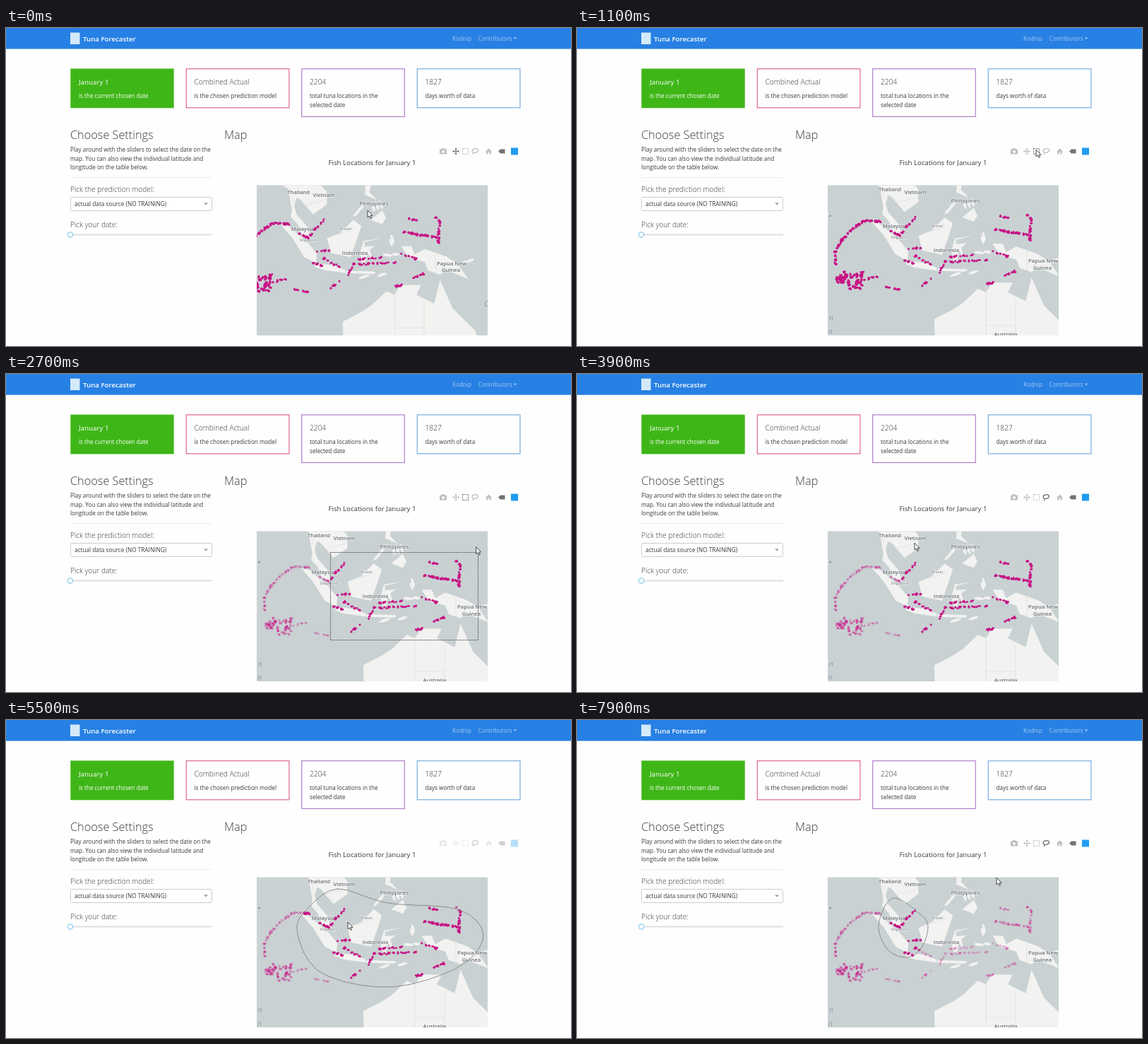
An HTML page with a canvas that plays this animation: 800 px wide and 450 px high, repeating every 8 s.

```html
<!DOCTYPE html>
<html lang="en">
<head>
<meta charset="utf-8">
<title>Tuna Forecaster</title>
<style>
html, body { margin: 0; width: 800px; height: 450px; overflow: hidden; background: #fefefe; }
svg, canvas { position: absolute; left: 0; top: 0; }
text { font: 8.15px "Open Sans", "Noto Sans", sans-serif; fill: #373a3c; }
.h { font-size: 10.2px; font-weight: 300; }
.big { font-size: 16.3px; font-weight: 300; }
.nav { fill: #a4caf3; }
.on { fill: #fff; }
.card { fill: none; stroke-width: 1.3; opacity: .85; }
</style>
</head>
<body>
<svg width="800" height="450" viewBox="0 0 800 450">
  <rect width="800" height="29.6" fill="#2780e3"/>
  <rect x="91" y="6.5" width="13.5" height="16.5" fill="#d3eafa"/>
  <text x="109" y="18.7" class="on" style="font-size:9.7px;font-weight:600">Tuna Forecaster</text>
  <text x="632" y="18" class="nav">Kodnip</text>
  <text x="668.5" y="18" class="nav">Contributors</text>
  <path d="M718.5 13.5h5l-2.5 2.5z" fill="#a4caf3"/>

  <rect x="91.3" y="57.5" width="146.4" height="55.8" fill="#3fb618"/>
  <rect class="card" x="255.3" y="57.8" width="145.6" height="55" stroke="#e0568c"/>
  <rect class="card" x="418.7" y="57.8" width="145.6" height="67.6" stroke="#aa74c6"/>
  <rect class="card" x="582.3" y="57.8" width="145.6" height="55" stroke="#6ba6df"/>
  <text x="103" y="79.7" class="on" style="font-size:9.8px">January 1</text>
  <text x="103" y="99" class="on">is the current chosen date</text>
  <text x="266.5" y="79.7" class="h">Combined Actual</text>
  <text x="266.5" y="99">is the chosen prediction model</text>
  <text x="430" y="79.7" class="h">2204</text>
  <text x="430" y="99">total tuna locations in the</text>
  <text x="430" y="111.5">selected date</text>
  <text x="593.5" y="79.7" class="h">1827</text>
  <text x="593.5" y="99">days worth of data</text>

  <text x="91" y="157.3" class="big">Choose Settings</text>
  <text x="309" y="157.3" class="big">Map</text>
  <text x="91" y="175">Play around with the sliders to select the date on the</text>
  <text x="91" y="187.5">map. You can also view the individual latitude and</text>
  <text x="91" y="200">longitude on the table below.</text>
  <path d="M91 211.5h201" stroke="#ececec"/>
  <text x="91" y="231.7" class="h">Pick the prediction model:</text>
  <rect x="91.5" y="239.5" width="200" height="19" rx="2" fill="#fff" stroke="#ccc"/>
  <text x="97" y="252" style="font-size:8.25px">actual data source (NO TRAINING)</text>
  <path d="M280 247.5h6l-3 3z" fill="#999"/>
  <text x="91" y="281.7" class="h">Pick your date:</text>
  <path d="M91 292.5h201" stroke="#dfdfe3" stroke-width="2"/>
  <circle cx="91" cy="292.5" r="3.6" fill="#fff" stroke="#8ccbec" stroke-width="1.3"/>
  <text x="456.5" y="193.5" style="font-size:9.7px">Fish Locations for January 1</text>
</svg>
<canvas id="stage" width="800" height="450"></canvas>

<script>
const ctx = document.getElementById('stage').getContext('2d');
const LOOP = 8000, STEP = 100, TAU = Math.PI * 2;
const FONT = '"Open Sans", "Noto Sans", sans-serif';

const clamp = v => Math.max(0, Math.min(1, v));
const ease = v => v * v * (3 - 2 * v);
const mix = (a, b, k) => a.map((v, i) => v + (b[i] - v) * k);
let seed = 7;
const rand = () => (seed = seed * 16807 % 2147483647) / 2147483647;

function polygon(pts) {
  const p = new Path2D();
  pts.forEach(([x, y]) => p.lineTo(x, y));
  p.closePath();
  return p;
}
const points = str => str.split(' ').map(p => p.split(',').map(Number));

// Mercator: longitude, latitude to stage
const DEG = 4.78;
const project = ([lon, lat]) =>
  [lon * DEG - 37.6, 301.5 - DEG * Math.asinh(Math.tan(lat * TAU / 360)) * 360 / TAU];

// Key corners of the larger coasts
const coasts = [
  '94,18 97.5,16 98.6,10 98.3,8 100.3,5.8 101.4,2.8 104.2,1.4 103.3,4.8 100,8.6 99.3,11 100,13.4 101,13 104.9,8.6 109,11.5 108.9,15.3 106,18',
  '95.3,5.6 97.5,5.2 103.1,.5 106,-3 105.8,-5.8 102.3,-4 98.7,1.7',
  '105.2,-6.8 106,-5.9 110.9,-6.4 114.4,-7.8 114.5,-8.7 108,-7.8',
  '109,1.5 113,3.2 116.8,7 119.2,5.2 117.8,1 116,-4 110.2,-2.8',
  '119.4,-5.5 118.8,-2.8 119.8,.8 125.2,1.6 120.2,.4 120.1,-.9 123.3,-.7 121.7,-1.9 122.7,-5.3 121,-2.8 120.4,-5.6',
  '120.5,18.5 122.3,18.4 121.6,15 124,12.7 120.2,14.3',
  '122,7 125.4,9.8 126.5,7.5 125.4,5.7',
  '131,-.8 134,-.8 135,-3.3 138,-1.6 144.5,-3.9 147.8,-6.1 150.8,-10.4 144,-7.7 142.6,-9.2 139,-8 138,-5.5 133,-4',
  '113.7,-22.5 113.9,-29 154,-29 153,-25 146.2,-18.8 142.5,-10.7 140.8,-17.5 135.5,-15 136.9,-12.2 130.8,-12.2 129,-15 126.6,-14 122.2,-18 119,-20'
];
const land = new Path2D();
for (const c of coasts) land.addPath(polygon(points(c).map(project)));

// Small islands: strings of ellipses between two places
function islands(n, from, to, length, tilt) {
  for (let i = 0; i < n; i++) {
    const [x, y] = project(mix(from, to, i / (n - 1)));
    const isle = new Path2D();
    isle.ellipse(x, y, length * (.7 + rand() * .6), 2, tilt, 0, TAU);
    land.addPath(isle);
  }
}
islands(5, [115.5, -8.4], [122, -8.6], 6, 0);
islands(2, [120, -9.8], [125.3, -9.2], 8, -.3);
islands(3, [122.6, 10.8], [125, 11.4], 6, 1.2);
islands(2, [117.8, 9], [119, 10.4], 6, -.8);
islands(2, [127, -3.4], [129.4, -3.2], 6, .1);
islands(2, [128, .3], [128.4, 1.3], 6, 1.3);
islands(2, [149.3, -5.8], [151.5, -5], 7, -.4);

const borders = new Path2D('M579 365V435M621 384V435M579 421H621M637 314V344M486 292L512 285L522 281M430 223L436 242M452 247L480 240');

const labels = [
  ['Thailand', 443, 231], ['Vietnam', 479, 235], ['Philippines', 550, 247],
  ['Malaysia', 449, 283], ['Indonesia', 523, 317], ['Papua New', 660, 332],
  ['Guinea', 659, 341.5], ['Australia', 607, 436], ['ka', 356, 268],
  ['Brunei', 510, 282, 5], ['Singapore', 457, 298, 5.2]
];

// Fish gather in short strings along shipping lanes
const busyLanes = [
  '366,335 365,318 374,301 390,284 406,273 432,274', '444,287 457,294 463,286',
  '463,329 478,333', '592,285 620,290 642,293', '637,264 643,270 641,303', '581,362 592,360'
];
const quietLanes = [
  '406,356 428,351', '436,366 458,371', '488,365 503,353', '465,282 481,266',
  '467,314 490,310', '478,322 504,336', '513,346 523,327', '529,324 562,321',
  '529,331 582,328', '595,264 613,270', '603,350 620,345 620,338', '587,316 612,324'
];
const fish = [];
function shoal(a, b, perPixel) {
  const length = Math.hypot(b[0] - a[0], b[1] - a[1]), knots = Math.ceil(length / 6);
  for (let i = 0; i < length * perPixel; i++) {
    const k = (Math.floor(rand() * knots) + rand() * .6) / knots;
    fish.push(mix(a, b, k).map(v => v + (rand() - .5) * 2.4));
  }
}
function stock(lanes, perPixel) {
  for (const pts of lanes.map(points))
    for (let i = 1; i < pts.length; i++) shoal(pts[i - 1], pts[i], perPixel);
}
stock(busyLanes, 1);
stock(quietLanes, .5);
for (let i = 0; i < 44; i++) {
  const x = 367 + rand() * 37, y = 346 + (x > 385 ? rand() * 24 : rand() * 15);
  shoal([x, y], [x + rand() * 8 - 4, y + rand() * 4 - 2], 2);
}

// Drag gestures
const box = { from: 1400, to: 2100, clear: 3200, start: [459.5, 252.5], end: [668.5, 376.5] };
const lassos = [
  { from: 4000, to: 5400, clear: 6300, ring: points('470,239 430,264 412,298 445,357 543,378 640,350 676,305 640,268 540,259') },
  { from: 6550, to: 7500, clear: LOOP, ring: points('485,274 497,292 488,322 467,336 440,325 427,290 447,252') }
];
const drags = [box, ...lassos];

// Where the pointer rests between gestures: time, place
const rests = [
  [0, [512, 258]], [200, [541, 255]], [400, [560, 231]], [900, [650, 172]], [1100, [650, 172]],
  [1400, box.start], [2100, box.end], [2400, box.end], [2900, [664, 173]], [3200, [664, 173]],
  [3900, [478, 239]], [4000, lassos[0].ring[0]], [5400, lassos[0].ring[0]], [5500, [484, 286]],
  [6550, lassos[1].ring[0]], [7500, lassos[1].ring[0]], [7900, [594, 223]]
];

// Smooth closed curve through the key points, u from 0 to 1
function onRing(pts, u) {
  const n = pts.length, pos = u * n, i = Math.floor(pos), f = pos - i;
  const [a, b, c, d] = [-1, 0, 1, 2].map(o => pts[(i + o + n) % n]);
  return b.map((v, j) => v + f / 2 * (c[j] - a[j] +
    f * (2 * a[j] - 5 * v + 4 * c[j] - d[j] + f * (3 * (v - c[j]) + d[j] - a[j]))));
}
const progress = (drag, t) => clamp((t - drag.from) / (drag.to - drag.from));
const boxCorner = t => mix(box.start, box.end, 1 - (1 - progress(box, t)) ** 2.1);

function pointerAt(t) {
  if (t >= box.from && t <= box.to) return boxCorner(t);
  const l = lassos.find(l => t >= l.from && t <= l.to);
  if (l) return onRing(l.ring, progress(l, t));
  const i = rests.findIndex(r => r[0] > t);
  if (i < 0) return rests[rests.length - 1][1];
  const [t0, a] = rests[i - 1], [t1, b] = rests[i];
  return mix(a, b, ease((t - t0) / (t1 - t0)));
}

// Region whose fish stay bright, and whether its outline shows
function selection(t) {
  if (t < box.from) return null;
  if (t < lassos[0].from) {
    const [x0, y0] = box.start, [x, y] = boxCorner(t), area = new Path2D();
    area.rect(x0, y0, Math.round(x - x0), Math.round(y - y0));
    return { area, outline: t < box.clear };
  }
  const l = lassos.find(l => t >= l.from && t < l.clear);
  if (!l) return { area: new Path2D(), outline: false };
  const u = progress(l, t), trail = [];
  for (let i = 0; i <= 40; i++) trail.push(onRing(l.ring, u * i / 40));
  return { area: polygon(trail), outline: true };
}

function drawLabels() {
  ctx.textAlign = 'center';
  ctx.strokeStyle = 'rgba(245,246,246,.75)';
  ctx.lineWidth = 1.6;
  for (const [s, x, y, size = 7.7] of labels) {
    ctx.font = `600 ${size}px ${FONT}`;
    ctx.fillStyle = size < 6 ? '#8b9296' : '#697177';
    ctx.strokeText(s, x, y);
    ctx.fillText(s, x, y);
  }
  ctx.font = `italic 10px ${FONT}`;
  ctx.fillStyle = '#8d999e';
  ctx.fillText('n', 360, 414);
  ctx.fillText('n', 359, 433);
  ctx.fillText('Coral', 718, 390);
}

function drawMap(t) {
  const pan = 1 - clamp(t / 200), sel = selection(t);
  ctx.save();
  ctx.beginPath();
  ctx.rect(355, 222.5, 327, 212.5);
  ctx.clip();
  ctx.fillStyle = '#c9d1d3';
  ctx.fillRect(355, 222, 327, 213);
  ctx.translate(-29 * pan, 3.5 * pan);
  ctx.lineJoin = 'round';
  ctx.fillStyle = '#f2f2f0';
  ctx.fill(land);
  ctx.strokeStyle = '#dcdfdf';
  ctx.lineWidth = .7;
  ctx.stroke(borders);
  drawLabels();

  ctx.fillStyle = '#c71585';
  for (const [x, y] of fish) {
    ctx.globalAlpha = !sel || ctx.isPointInPath(sel.area, x, y) ? 1 : .22;
    ctx.beginPath();
    ctx.arc(x, y, 1.5, 0, TAU);
    ctx.fill();
  }
  ctx.globalAlpha = 1;
  if (sel && sel.outline) {
    ctx.lineWidth = 1;
    ctx.strokeStyle = 'rgba(255,255,255,.6)';
    ctx.stroke(sel.area);
    ctx.setLineDash([1.2, 1.2]);
    ctx.strokeStyle = '#222';
    ctx.stroke(sel.area);
  }
  ctx.restore();
}

const icons = [
  [619, 'M-5-3H-2.5L-1.5-4.5H1.5L2.5-3H5V4H-5ZM2 .5A2 2 0 1 0-2 .5A2 2 0 1 0 2 .5Z'],
  [637, 'M0-5L2-2.7H.6V-.6H2.7V-2L5 0L2.7 2V.6H.6V2.7H2L0 5L-2 2.7H-.6V.6H-2.7V2L-5 0L-2.7-2V-.6H-.6V-2.7H-2Z', 'pan'],
  [650.5, '', 'box'],
  [664, '', 'lasso'],
  [683.5, 'M0-4L4.5 0H3.3V4H.9V1H-.9V4H-3.3V0H-4.5Z'],
  [702, 'M-5 0L-2-3H4.5V3H-2Z', 'tag']
].map(([x, d, name]) => [x, new Path2D(d), name]);

function drawBar(t) {
  const mode = t < 1000 ? 'pan' : t < 3100 ? 'box' : 'lasso';
  // The bar hides while dragging and fades back afterwards
  const shown = Math.min(...drags.map(d =>
    1 - clamp((t - d.from - 150) / 150) + clamp((t - d.to) / 300)));
  for (const [x, shape, name] of icons) {
    ctx.save();
    ctx.translate(x, 174.5);
    ctx.globalAlpha = shown * (name === mode || name === 'tag' ? .75 : .33);
    ctx.fillStyle = ctx.strokeStyle = '#444';
    ctx.fill(shape, 'evenodd');
    if (name === 'box') {
      ctx.setLineDash([2, 1]);
      ctx.strokeRect(-4, -4, 8, 8);
    } else if (name === 'lasso') {
      ctx.lineWidth = 1.3;
      ctx.beginPath();
      ctx.ellipse(.3, -1, 4.2, 2.8, -.2, 0, TAU);
      ctx.moveTo(-3, 1);
      ctx.quadraticCurveTo(-1, 2.5, -3, 4.5);
      ctx.stroke();
    }
    ctx.restore();
  }
  ctx.globalAlpha = shown;
  ctx.fillStyle = '#229bf2';
  ctx.fillRect(715, 169.5, 10, 10);
  ctx.globalAlpha = 1;
}

const arrow = new Path2D('M0 0V10L2.3 8L4 11.5L5.6 10.7L4 7.4H7Z');
function drawPointer(t) {
  ctx.save();
  ctx.translate(...pointerAt(t));
  ctx.fillStyle = '#fff';
  ctx.strokeStyle = '#333';
  ctx.lineWidth = .9;
  ctx.fill(arrow);
  ctx.stroke(arrow);
  ctx.restore();
}

function frame(now) {
  const t = Math.floor(now % LOOP / STEP) * STEP;
  ctx.clearRect(0, 0, 800, 450);
  drawMap(t);
  drawBar(t);
  drawPointer(t);
  requestAnimationFrame(frame);
}
requestAnimationFrame(frame);
</script>
</body>
</html>
```
